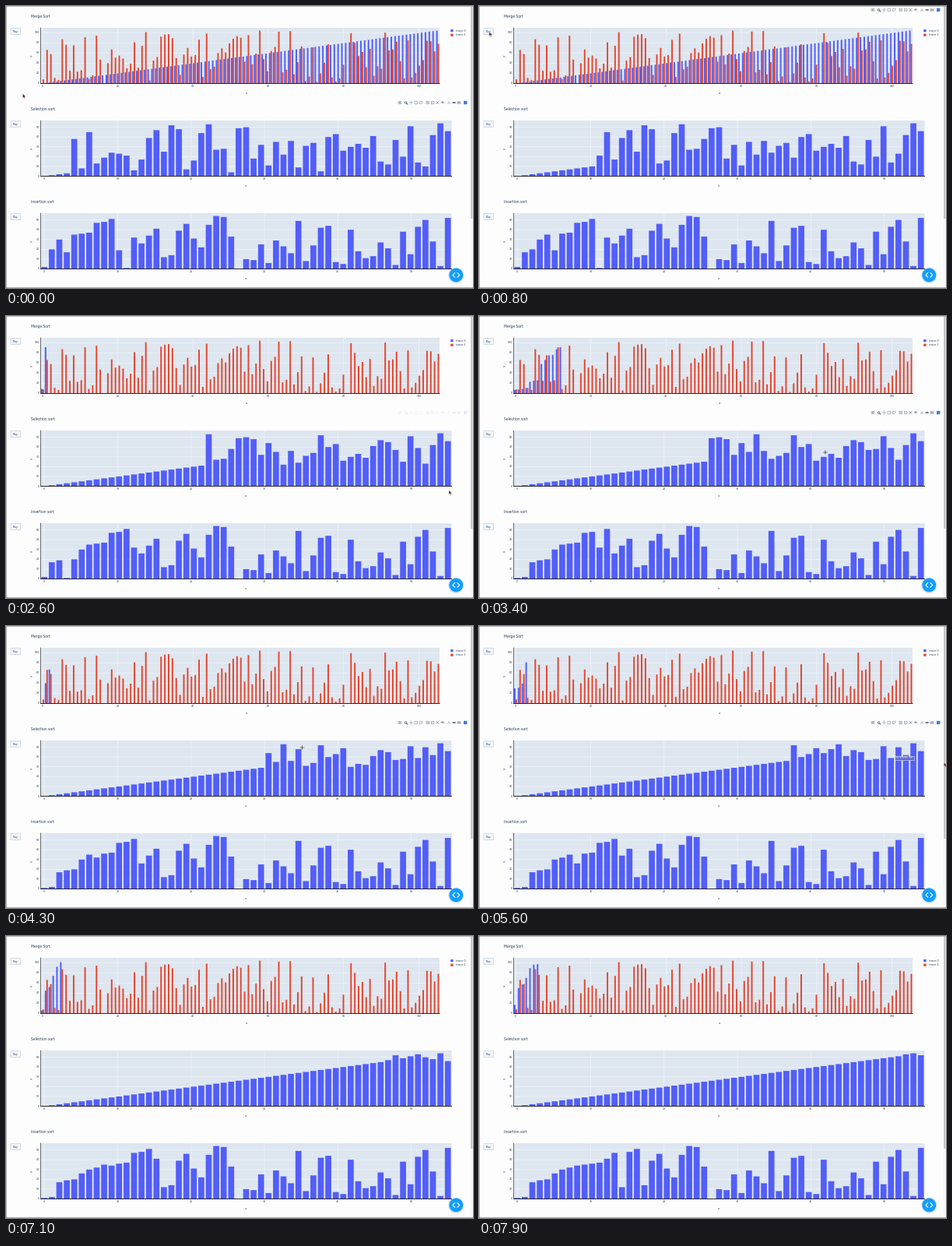
A matplotlib script that plays this animation: 600x362 px, repeating every 8 s.

```python
import numpy as np
import matplotlib.pyplot as plt
from matplotlib.animation import FuncAnimation
from matplotlib.collections import PolyCollection
from matplotlib.patches import Circle, FancyBboxPatch, Polygon, Rectangle

W, H, DPI = 600, 362, 100
FRAMES, STEP = 80, 100
INK, BLUE, RED = "#2a3f5f", "#525ef7", "#e2472f"
LEFT, PLOT_H = 44.5, 71.5

MERGE = [
    8, 66, 58, 11, 7, 87, 76, 25, 75, 23, 26, 91, 9, 16, 94, 47, 0, 40, 67, 51,
    55, 49, 30, 39, 81, 31, 74, 101, 6, 45, 52, 92, 96, 97, 89, 50, 17, 57, 70,
    53, 56, 86, 13, 98, 28, 33, 60, 69, 61, 79, 88, 93, 90, 43, 95, 38, 59, 104,
    48, 24, 64, 72, 102, 22, 27, 103, 18, 42, 73, 5, 14, 71, 3, 20, 41, 77, 12,
    4, 10, 37, 1, 99, 80, 54, 62, 32, 68, 15, 34, 29, 100, 65, 67, 82, 44, 10,
    85, 12, 21, 35, 46, 84, 83, 63, 78]
SELECTION = [
    0, 1, 2, 3, 38, 8, 45, 13, 19, 24, 23, 21, 6, 17, 39, 47, 25, 52, 48, 7,
    16, 44, 53, 27, 28, 4, 49, 50, 18, 32, 11, 35, 22, 36, 9, 31, 34, 5, 40,
    43, 26, 30, 33, 29, 41, 15, 12, 37, 20, 51, 14, 10, 42, 54, 46]
INSERTION = [
    2, 20, 30, 17, 35, 36, 37, 47, 48, 51, 19, 1, 32, 26, 34, 41, 12, 14, 39,
    46, 31, 22, 45, 54, 53, 33, 0, 10, 9, 25, 6, 29, 23, 16, 49, 8, 24, 42, 44,
    7, 5, 40, 18, 11, 13, 27, 21, 4, 38, 15, 43, 50, 28, 3, 52]


def merge_states(a):
    """Every merged slice, in the order the recursion finishes them."""
    states = [list(range(len(a)))]

    def sort(part):
        if len(part) < 2:
            return part
        mid = len(part) // 2
        merged = sorted(sort(part[:mid]) + sort(part[mid:]))
        states.append(merged)
        return merged

    sort(a)
    return states


def selection_states(a):
    a, states = list(a), [list(a)]
    for i in range(len(a)):
        k = a.index(min(a[i:]), i)
        a[i], a[k] = a[k], a[i]
        states.append(list(a))
    return states


def insertion_states(a):
    a, states = list(a), [list(a)]
    for i in range(1, len(a)):
        j = i
        while j and a[j - 1] > a[j]:
            a[j - 1], a[j] = a[j], a[j - 1]
            states.append(list(a))
            j -= 1
    return states


# Playback speed: time in ms against steps done
CLOCK = [0, 1500, 2600, 4300, 5600, 7100, 7900]
SELECT_AT = [4, 17, 22, 30, 37, 46, 52]
INSERT_AT = [0, 13, 18, 26, 32, 40, 46]
MERGE_CLOCK = [900] + CLOCK[1:]
MERGE_AT = [0, 4, 9, 16, 22, 30, 36]


def step_at(t, clock, steps):
    return int(np.interp(t, clock, steps) + 0.5)


fig = plt.figure(figsize=(W / DPI, H / DPI), dpi=DPI, facecolor="#fdfdfd")
ax = fig.add_axes([0, 0, 1, 1])
ax.set(xlim=(0, W), ylim=(H, 0))
ax.axis("off")


def label(x, y, s, px, ha="left", va="center", color=INK, **kw):
    return ax.text(x, y, s, size=px * 72 / DPI, family="DejaVu Sans",
                   color=color, ha=ha, va=va, **kw)


def rect(x, y, w, h, color, **kw):
    return ax.add_patch(Rectangle((x, y), w, h, fc=color, lw=0, snap=False, **kw))


def line(xs, ys, color, px=0.6, **kw):
    return ax.plot(xs, ys, color=color, lw=px * 72 / DPI, snap=False, **kw)[0]


class Chart:
    """A bar chart whose x values run evenly from 0 to n."""

    def __init__(self, title, top, right, n, tick):
        self.top, self.base, self.right, self.n = top, top + PLOT_H, right, n
        self.pitch = (right - LEFT) / n
        self.scale = PLOT_H * 0.95 / (n - 1)
        unit = self.pitch * (n - 1) / n

        rect(LEFT, top, right - LEFT, PLOT_H, "#dee6f0", zorder=1)
        for v in range(0, n, tick):
            x, y = self.center(0) + v * unit, self.base - v * self.scale
            line([x, x], [top, self.base], "#f2f5fa", 0.7, zorder=2)
            line([LEFT, right], [y, y], "#f2f5fa", 0.7, zorder=2)
            label(x, self.base + 3.2, str(v), 3.2, "center")
            label(43, y, str(v), 3.2, "right")
        line([LEFT, right], [self.base] * 2, "#151515", 0.9, zorder=5)
        line([LEFT, LEFT], [top, self.base], "#333333", 0.7, zorder=5)

        label(32, top - 14.6, title, 4.5)
        label((LEFT + right) / 2 + (8 if n > 60 else 0), top + 84, "x", 4, "center")
        label(33.3, top + 36, "y", 4, "center", rotation=90)
        ax.add_patch(FancyBboxPatch(
            (6, top + 0.3), 12.6, 8.4, boxstyle="round,pad=0,rounding_size=0.8",
            fc="#f3f7fb", ec="#bccbdd", lw=0.45))
        label(12.3, top + 4.6, "Play", 3.2, "center")

    def center(self, i):
        return LEFT + self.pitch * (i + 0.5)

    def verts(self, values, lo=-0.4, hi=0.4):
        out = []
        for i, v in enumerate(values):
            a, b = self.center(i) + lo * self.pitch, self.center(i) + hi * self.pitch
            y = self.base - v * self.scale
            out.append([(a, self.base), (a, y), (b, y), (b, self.base)])
        return out

    def bars(self, color, values=(), lo=-0.4, hi=0.4):
        bars = PolyCollection(self.verts(values, lo, hi), facecolors=color,
                              linewidths=0, snap=False, zorder=4)
        ax.add_collection(bars, autolim=False)
        return bars

    def holds(self, x, y):
        return LEFT < x < self.right and self.top < y < self.base


def modebar(y):
    """Toolbar icons; returned so that they can be faded together."""
    grey, dark = "#9aa3b2", "#626c80"
    parts = []

    def box(x, w, h, color, fill=True):
        parts.append(ax.add_patch(Rectangle(
            (x - w / 2, y - h / 2), w, h, fc=color if fill else "none",
            ec=color, lw=0 if fill else 0.5, snap=False)))

    def stroke(dx, dy, color=grey, px=0.7):
        parts.append(line(dx, np.add(y, dy), color, px))

    def ring(x, r, color):
        parts.append(ax.add_patch(Circle((x, y), r, fc="none", ec=color, lw=0.6)))

    box(506, 4, 2.8, grey, False)
    ring(506, 0.7, grey)
    ring(513.6, 1.3, dark)
    stroke([514.5, 516], [0.9, 2.2], dark, 1)
    stroke([518, 522.6], [0, 0])
    stroke([520.3, 520.3], [-2.3, 2.3])
    box(526.8, 3.6, 3.6, grey, False)
    parts.append(ax.add_patch(Polygon(
        [(531, y - 1.5), (535.2, y - 1.8), (534.6, y + 0.8), (531.6, y + 1.8)],
        fc="none", ec=grey, lw=0.5)))
    for x, plus in ((541.8, True), (548.2, False)):
        box(x, 3.6, 3.6, grey, False)
        stroke([x - 1, x + 1], [0, 0])
        if plus:
            stroke([x, x], [-1, 1])
    stroke([552.6, 556.2, np.nan, 552.6, 556.2], [-1.8, 1.8, np.nan, 1.8, -1.8])
    stroke([558.8, 561, 563.2], [0.2, -1.8, 0.2])
    box(561, 2.4, 2, grey)
    stroke([567, 569, 571], [1.6, -0.6, 1.6], px=0.5)
    stroke([569, 569], [-1.8, 1.8], px=0.5)
    box(575.6, 4, 1.8, dark)
    stroke([580, 583.8, np.nan, 580, 583.8], [-0.9, -0.9, np.nan, 0.9, 0.9], dark, 0.9)
    box(590.2, 4.4, 4.4, "#447adb")
    return parts


# Page edges and scrollbar
line([0, W], [0.3, 0.3], "#9a9a9a", 0.8)
line([0.3, 0.3], [0, H], "#8a8a8a", 0.8)
line([0, W], [H - 0.3] * 2, "#8a8a8a", 0.8)
rect(596.6, 0.8, 3.4, H - 1.6, "#f6f6f6")
rect(597.3, 1, 2, 272, "#bdbdbd")

merge = Chart("Merge Sort", 28, 557, len(MERGE), 20)
select = Chart("Selection sort", 147, 572.5, len(SELECTION), 10)
insert = Chart("Insertion sort", 266, 572.5, len(INSERTION), 10)

merge.bars(RED, MERGE, 0, 0.4)
merge_bars = merge.bars(BLUE)
select_bars = select.bars(BLUE)
insert_bars = insert.bars(BLUE)

for y, color, name in ((31.7, BLUE, "trace 0"), (37.2, RED, "trace 1")):
    rect(571.2, y - 1.6, 3.4, 3.2, color)
    label(577.6, y, name, 3.5)

# Round code button
for r, alpha in ((10.4, 0.08), (9.8, 0.12)):
    ax.add_patch(Circle((578.3, 345.8), r, fc="#0a4f90", lw=0, alpha=alpha))
ax.add_patch(Circle((578.3, 345.4), 8.8, fc="#119dff", lw=0))
for s in (-1, 1):
    line(578.3 + s * np.array([1.7, 4.4, 1.7]), [342.6, 345.4, 348.2], "white", 1.1)

merge_tools, select_tools = modebar(5), modebar(124)

ARROW = np.array([(0, 0), (0, 5.6), (1.3, 4.5), (2.2, 6.5), (3.1, 6.1),
                  (2.3, 4.2), (4, 4.1)])
arrow = ax.add_patch(Polygon(ARROW, fc="#45201f", ec="#f4e9e8", lw=0.3, zorder=9))
cross = line([], [], "#5a4444", 0.7, zorder=9)
tip = label(0, 0, "", 3.1, color="white", zorder=8,
            bbox=dict(boxstyle="square,pad=0.25", fc="#5f6ad0", ec="#e8ecf8", lw=0.4))

PATH = np.array([
    (0, 21.5, 112.5), (300, 18, 90), (700, 13, 33), (1000, 13, 33),
    (1500, 67, 55), (1800, 150, 85), (2100, 420, 105), (2300, 597, 150),
    (2500, 590, 205), (2600, 569, 223.5), (2900, 520, 200), (3500, 430, 170),
    (4300, 380.5, 156), (4700, 400, 160), (5200, 528, 182), (5500, 531, 180),
    (5600, 597.3, 175), (5700, 606, 172)])


def cursor_at(t):
    return [np.interp(t, PATH[:, 0], PATH[:, k]) for k in (1, 2)]


def hovered(t, values):
    x, y = cursor_at(t)
    i = int((x - LEFT) // select.pitch)
    if select.holds(x, y) and y > select.base - values[i] * select.scale:
        return i
    return None


def show_tip(t, values):
    i = hovered(t, values)
    fading = i is None and t > 0
    if fading:
        i = hovered(t - STEP, values)
    tip.set_visible(i is not None)
    if i is None:
        return
    x, flip = select.center(i), select.center(i) > 560
    tip.set_text(f"({i * select.n / (select.n - 1):.7g}, {values[i]})")
    tip.set_position((x - 5 if flip else x + 5, select.base - values[i] * select.scale))
    tip.set_ha("right" if flip else "left")
    tip.set_alpha(0.85 if fading else 1)


def fade(parts, alpha):
    for p in parts:
        p.set_alpha(alpha)
        p.set_visible(alpha > 0)


merge_log = merge_states(MERGE)
select_log = selection_states(SELECTION)
insert_log = insertion_states(INSERTION)


def update(n):
    t = n * STEP
    chosen = select_log[step_at(t, CLOCK, SELECT_AT)]
    merged = merge_log[step_at(t, MERGE_CLOCK, MERGE_AT)]
    merge_bars.set_verts(merge.verts(merged, -0.4, 0))
    select_bars.set_verts(select.verts(chosen))
    insert_bars.set_verts(insert.verts(insert_log[step_at(t, CLOCK, INSERT_AT)]))

    fade(merge_tools, np.interp(t, [200, 500, 1900, 2200], [0, 1, 1, 0]))
    fade(select_tools, np.interp(t, [100, 400, 2560, 2860, 5600, 5900],
                                 [1, 0, 0, 1, 1, 0]))

    x, y = cursor_at(t)
    inside = any(c.holds(x, y) for c in (merge, select, insert))
    arrow.set_visible(not inside)
    cross.set_visible(inside)
    arrow.set_xy(ARROW + (x, y))
    cross.set_data([x - 2.5, x + 2.5, np.nan, x, x], [y, y, np.nan, y - 2.5, y + 2.5])
    show_tip(t, chosen)


anim = FuncAnimation(fig, update, frames=FRAMES, interval=STEP, repeat=True)
plt.show()
```
